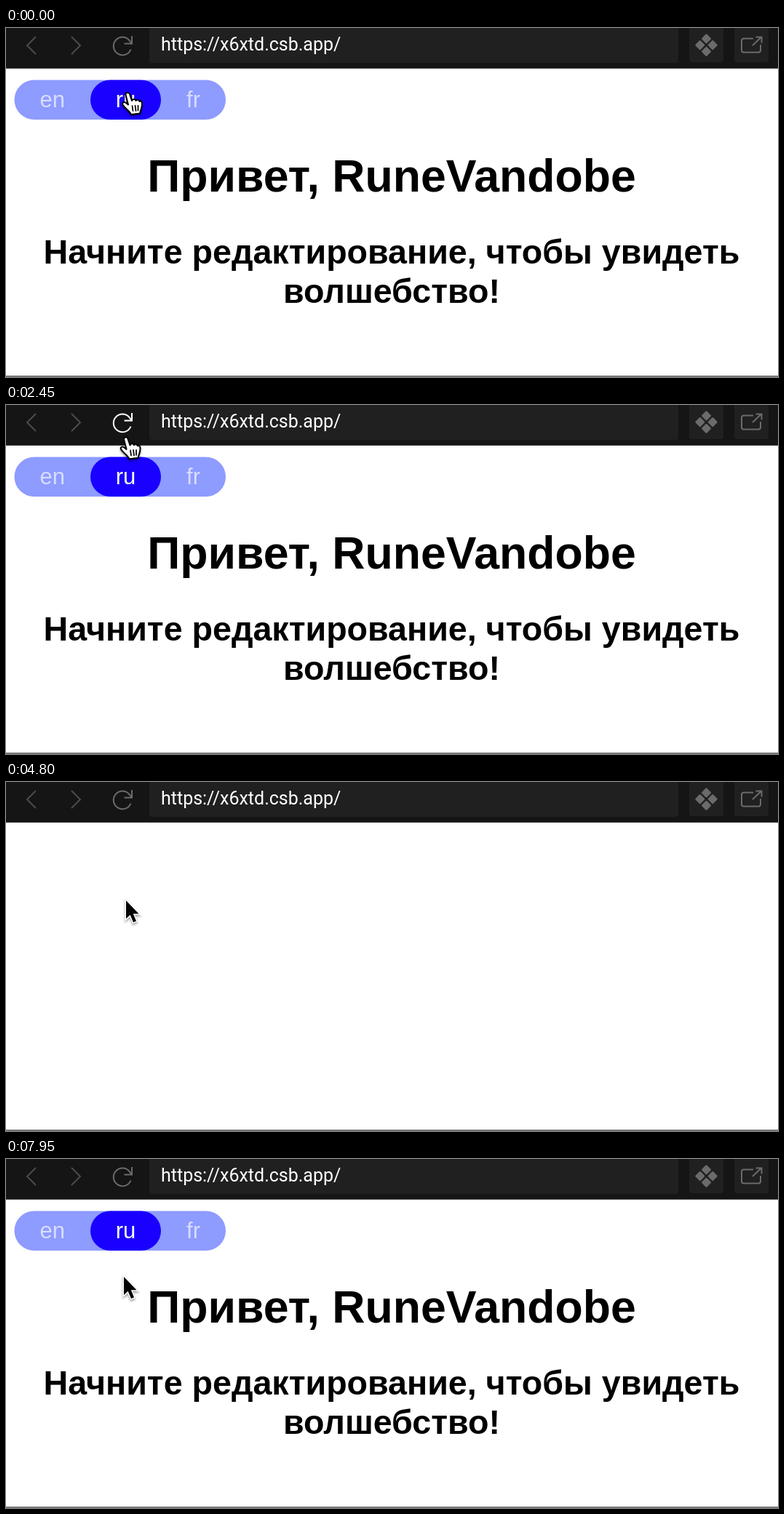
An HTML page that plays this animation: 1061x480 px, repeating every 8 s.

```html
<!DOCTYPE html>
<html lang="en">
<head>
<meta charset="utf-8">
<title>Language switcher</title>
<style>
  html, body { margin: 0; width: 100%; height: 100%; overflow: hidden; background: #fff; }
  svg { display: block; width: 1061px; height: 480px; }
  text { font-family: "Liberation Sans", Arial, sans-serif; }
  .label { font-size: 31px; fill: #fff; text-anchor: middle; }
  .title, .line { font-weight: bold; text-anchor: middle; }
  .title { font-size: 62.6px; }
  .line { font-size: 46.6px; }
  .url { font: 25px Roboto, sans-serif; fill: #fff; }
  .icon { fill: none; stroke: #6b6b6b; stroke-width: 2; }
  .cursor { filter: drop-shadow(0 2px 1.5px rgba(0, 0, 0, .4)); }
</style>
</head>
<body>
<svg viewBox="0 0 1061 480">
  <rect width="1061" height="480" fill="#fff"/>
  <rect y="478" width="1061" height="2" fill="#777"/>

  <g id="page">
    <rect x="11.5" y="71.5" width="290.5" height="54.5" rx="27.25" fill="#8e9bff"/>
    <g id="tabs"></g>
    <text class="title" x="530" y="225" id="title"></text>
    <text class="line" x="530" y="324" id="line1"></text>
    <text class="line" x="530" y="378" id="line2"></text>
  </g>

  <rect width="1061" height="55.75" fill="#151515"/>
  <g fill="#202020">
    <rect x="197" y="-6" width="727" height="54" rx="4"/>
    <rect x="939" y="-6" width="47" height="53" rx="4"/>
    <rect x="1001" y="-6" width="47" height="53" rx="4"/>
  </g>
  <text class="url" x="213" y="31">https://x6xtd.csb.app/</text>
  <path class="icon" style="stroke:#4b4b4b" d="M41 12L29 24L41 36M90 12L102 24L90 36"/>
  <path class="icon" id="reload" d="M171.500 29.500A12.300 12.300 0 1 1 169.500 17L172.500 21M173 11V21.500H162.500"/>
  <g id="diamonds" fill="#6b6b6b"></g>
  <path class="icon" d="M1027 14.500H1014Q1011 14.500 1011 17.500V30.500Q1011 33.500 1014 33.500H1034Q1037 33.500 1037 30.500V23M1026 24L1038 12.500M1030.500 12.500H1038.500V20.500"/>

  <g id="hand" class="cursor" fill="#fff" stroke="#000" stroke-width="2" stroke-linejoin="round" stroke-linecap="round">
    <path d="M-3.500 3C-4-.5 1-1 2 2L5 11C6 8 10 8.500 10.500 11C11.500 9 15 9.500 15.500 12C17 10.500 19 12 19 15C19 22 17 23 16 28.500L4 30C2 25-5 21-7.500 16.500C-9 13-5 12-2.500 14.500L0 16.500Z"/>
    <path d="M5.500 18L6.500 25M9.500 17.500L10.500 25M13.500 17.500V24.500" stroke-width="1.700"/>
  </g>
  <path id="arrow" class="cursor" d="M0 0V25L5.600 19.800L10 30L14 28.300L9.800 18.300H17.500Z" stroke="#fff" stroke-width="3" paint-order="stroke"/>
</svg>

<script>
const LOOP = 8000, FR_CLICK = 950, RU_CLICK = 2150, LEAVE_RELOAD = 3850, BLANK = 4800, LOADED = 5450;

const copy = {
  ru: ["Привет, RuneVandobe", "Начните редактирование, чтобы увидеть", "волшебство!"],
  fr: ["bonjour, RuneVandobe", "Commencez à éditer pour voir un peu de", "magie se produire!"]
};

// Pointer path: time, x, y of the hotspot
const path = [
  [0, 168, 89], [50, 168, 89], [850, 246, 101], [1700, 246, 101], [2020, 167, 98],
  [2250, 167, 98], [2550, 165, 26], [3500, 166, 34], [3800, 166, 34],
  [4150, 165, 163], [7949, 165, 163], [7950, 162, 162], [LOOP, 162, 162]
];

const $ = id => document.getElementById(id);
const clamp = v => Math.min(1, Math.max(0, v));
const fade = (t, start) => clamp((t - start + 50) / 150);

function pointer(t) {
  const i = path.findIndex(key => key[0] > t);
  const [t0, x0, y0] = path[i - 1], [t1, x1, y1] = path[i];
  const u = (t - t0) / (t1 - t0), s = u * u * (3 - 2 * u);
  return [x0 + (x1 - x0) * s, y0 + (y1 - y0) * s];
}

$("tabs").innerHTML = [["en", 11.5, 104.5], ["ru", 116, 97], ["fr", 213, 89]].map(([name, x, w]) =>
  `<rect id="${name}Pill" x="${x}" y="71.5" width="${w}" height="54.5" rx="27.25" fill="#1a00ff"/>
   <text id="${name}Label" class="label" x="${x + w / 2}" y="108.5">${name}</text>`).join("");

$("diamonds").innerHTML = [[0, -8.7], [8.7, 0], [0, 8.7], [-8.7, 0]].map(([x, y]) =>
  `<rect x="-5" y="-5" width="10" height="10" rx="1.5" transform="translate(${962.5 + x} ${23.5 + y}) rotate(45)"/>`).join("");

function draw(t) {
  const fr = fade(t, FR_CLICK) - fade(t, RU_CLICK);
  const active = { en: 0, ru: 1 - fr, fr };
  for (const name in active) {
    $(name + "Pill").setAttribute("opacity", active[name]);
    $(name + "Label").setAttribute("fill-opacity", 0.66 + 0.34 * active[name]);
  }
  const lines = copy[t >= FR_CLICK && t < RU_CLICK ? "fr" : "ru"];
  ["title", "line1", "line2"].forEach((id, i) => $(id).textContent = lines[i]);
  $("page").style.display = t >= BLANK && t < LOADED ? "none" : "";

  const [x, y] = pointer(t);
  const onReload = y < 46, onTabs = y > 71 && y < 126;
  $("reload").style.stroke = onReload && t < LEAVE_RELOAD ? "#fff" : "";
  for (const id of ["hand", "arrow"]) {
    $(id).setAttribute("transform", `translate(${x} ${y})`);
    $(id).style.display = (id === "hand") === (onReload || onTabs) ? "" : "none";
  }
}

function tick() {
  draw(performance.now() % LOOP);
  requestAnimationFrame(tick);
}
tick();
</script>
</body>
</html>
```
